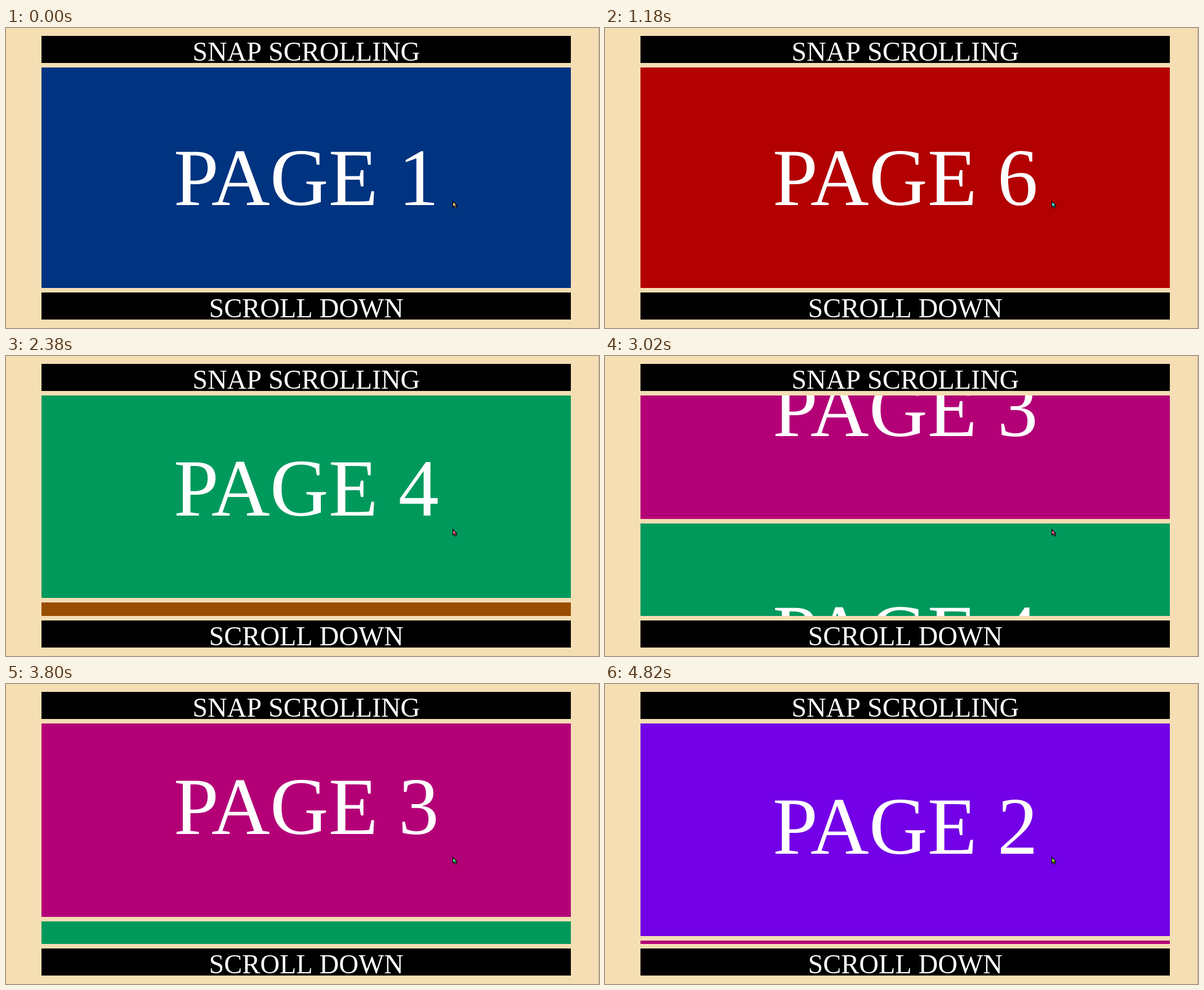
These frames come from a looping animation (1053x532 px, 4.92 s). An HTML page with a canvas:

```html
<!DOCTYPE html>
<html lang="en">
<head>
<meta charset="utf-8">
<title>Snap scrolling</title>
<style>
  html, body { margin: 0; width: 100%; height: 100%; overflow: hidden; background: #f5deb3; }
  canvas { display: block; width: 1053px; height: 532px; }
</style>
</head>
<body>
<canvas id="stage" width="1053" height="532"></canvas>
<script>
const ctx = document.getElementById('stage').getContext('2d');
const LOOP = 4920;
const LEFT = 63, WIDTH = 940, MID = 533.25;
const VIEW_TOP = 70, VIEW_BOTTOM = 461;
const PAGE_HEIGHT = 390.5, PITCH = 398.5;
const COLORS = ['#003380', '#7300e6', '#b30077', '#00995c', '#994d00', '#b30000'];

// Each glide moves by whole pages along an S-curve centred on mid,
// and is redrawn only once per step (all times in ms).
const GLIDES = [
  { pages: 5, start: 380, step: 140, mid: 464 },
  { pages: -1, start: 1430, step: 170, mid: 1420 },
  { pages: -1, start: 2070, step: 155, mid: 2220 },
  { pages: -1, start: 3020, step: 170, mid: 3002 },
  { pages: 1, start: 3800, step: 160, mid: 3860, pace: 30 },
  { pages: -2, start: 4480, step: 170, mid: 4555 }
];

function travel({ pages, start, step, mid, pace = 65 }, ms) {
  if (ms < start) return 0;
  const held = start + Math.floor((ms - start) / step) * step;
  return pages / (1 + Math.exp((mid - held) / pace));
}

function scrollAt(ms) {
  return PITCH * GLIDES.reduce((sum, glide) => sum + travel(glide, ms), 0);
}

function label(text, size, baseline) {
  ctx.font = `${size}px "Liberation Serif", "Times New Roman", serif`;
  ctx.textAlign = 'center';
  ctx.fillStyle = '#fff';
  ctx.fillText(text, MID, baseline);
}

function bar(text, top) {
  ctx.fillStyle = '#000';
  ctx.fillRect(LEFT, top, WIDTH, 48);
  label(text, 48, top + 43.5);
}

function pages(scroll) {
  ctx.save();
  ctx.beginPath();
  ctx.rect(LEFT, VIEW_TOP, WIDTH, VIEW_BOTTOM - VIEW_TOP);
  ctx.clip();
  COLORS.forEach((color, i) => {
    const y = VIEW_TOP + i * PITCH - scroll;
    const top = Math.round(y), bottom = Math.round(y + PAGE_HEIGHT);
    if (top > VIEW_BOTTOM || bottom < VIEW_TOP) return;
    ctx.fillStyle = color;
    ctx.fillRect(LEFT, top, WIDTH, bottom - top);
    label(`PAGE ${i + 1}`, 144, y + 244);
  });
  ctx.restore();
}

// The pointer shows the inverse of whatever lies below it
function pointer(x, y) {
  const arrow = new Path2D('M0 0V10.2L2.4 8L4.4 12L6.3 11.2L4.5 7.3H7.4Z');
  ctx.save();
  ctx.translate(x, y);
  ctx.globalCompositeOperation = 'difference';
  ctx.fillStyle = '#fff';
  ctx.fill(arrow);
  ctx.globalCompositeOperation = 'source-over';
  ctx.strokeStyle = '#000';
  ctx.lineWidth = 1.2;
  ctx.stroke(arrow);
  ctx.restore();
}

function draw(now) {
  ctx.fillStyle = '#f5deb3';
  ctx.fillRect(0, 0, 1053, 532);
  ctx.fillStyle = '#b9b3a6';
  ctx.fillRect(1052, 0, 1, 532);
  pages(scrollAt(now % LOOP));
  bar('SNAP SCROLLING', 14);
  bar('SCROLL DOWN', 469);
  pointer(793.5, 307.5);
}

const start = performance.now();
function tick() {
  draw(performance.now() - start);
  requestAnimationFrame(tick);
}
tick();
</script>
</body>
</html>
```
